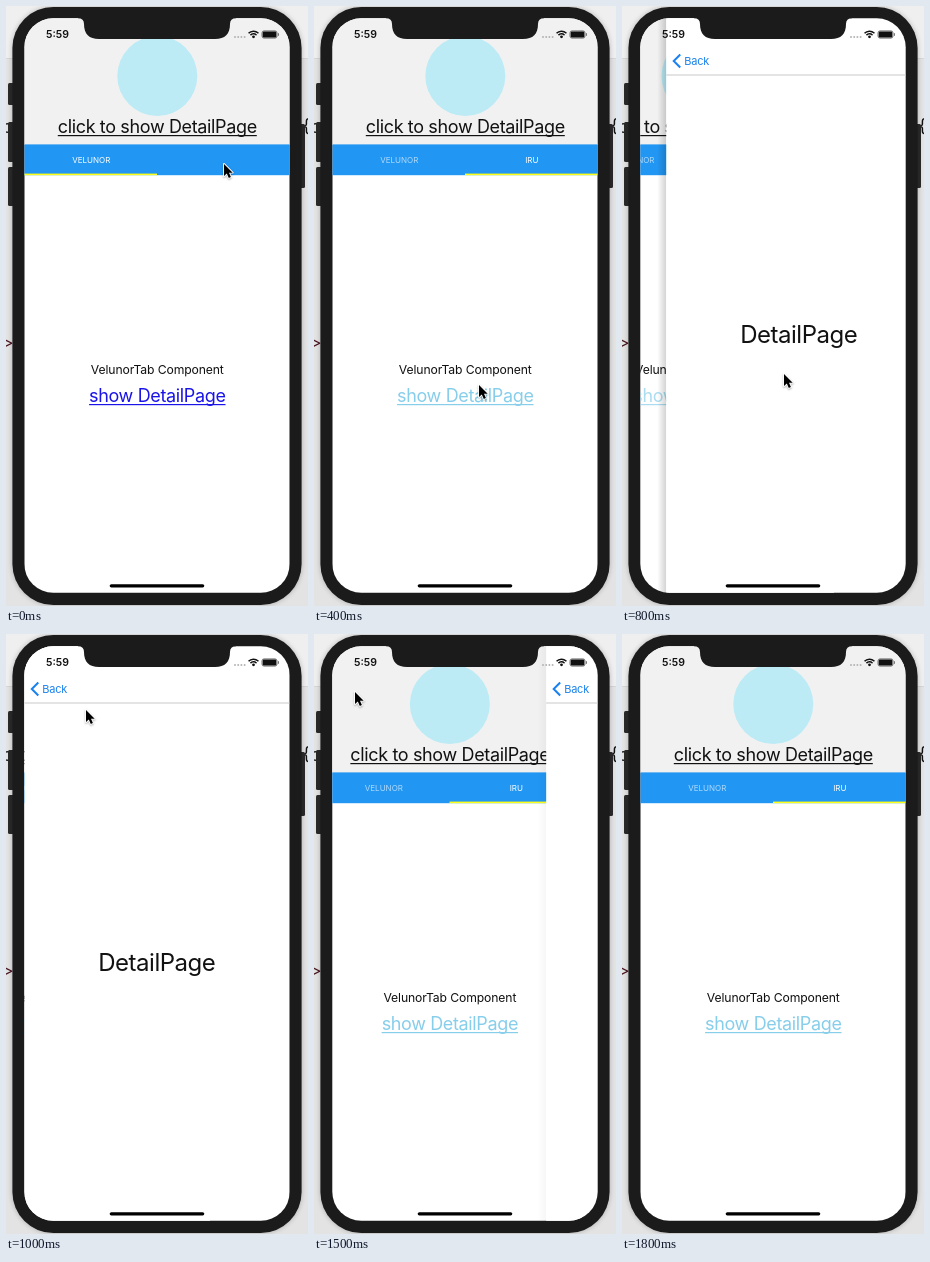
An HTML page with a canvas for the animation above (1900 ms loop, 302 px wide and 600 px high).

```html
<!DOCTYPE html>
<html lang="en">
<head>
<meta charset="utf-8">
<title>Tab and detail navigation</title>
<style>
  html, body { margin: 0; width: 100%; height: 100%; overflow: hidden; background: #e4e4e4; }
  canvas { display: block; width: 302px; height: 600px; }
</style>
</head>
<body>
<canvas id="stage"></canvas>
<script>
const W = 302, H = 600, LOOP = 1900, STEP = 100;
const SCREEN = { x: 18.3, y: 12.3, w: 265.4, h: 574.5, r: 29 };
const PARALLAX = 0.3;
const PUSH = 700, POP = 1400;

const canvas = document.getElementById('stage');
const ctx = canvas.getContext('2d');
const dpr = window.devicePixelRatio || 1;
canvas.width = W * dpr;
canvas.height = H * dpr;

// [time, x, y] of the pointer tip
const POINTER = [
  [0, 218, 158], [100, 218, 158], [400, 165, 379], [600, 161, 388],
  [700, 161, 388], [800, 162, 368], [1000, 80, 76], [1200, 41, 58],
  [1600, 41, 58], [1700, -20, 80], [1900, -20, 80]
];

const clamp = v => Math.max(0, Math.min(1, v));
const settle = (elapsed, tau) => {
  const p = elapsed <= 0 ? 0 : 1 - Math.exp(-elapsed / tau);
  return p > 0.996 ? 1 : p;
};

function pointerAt(t) {
  const i = POINTER.findIndex((k, n) => n > 0 && t <= k[0]);
  const [t0, x0, y0] = POINTER[i - 1], [t1, x1, y1] = POINTER[i];
  const u = (t - t0) / (t1 - t0), e = u * u * (3 - 2 * u);
  return [x0 + (x1 - x0) * e, y0 + (y1 - y0) * e];
}

function rect(x, y, w, h, color) {
  ctx.fillStyle = color;
  ctx.fillRect(x, y, w, h);
}

function roundRect(x, y, w, h, r, color) {
  ctx.fillStyle = color;
  ctx.beginPath();
  ctx.roundRect(x, y, w, h, r);
  ctx.fill();
}

function circle(x, y, r, color) {
  ctx.fillStyle = color;
  ctx.beginPath();
  ctx.arc(x, y, r, 0, 7);
  ctx.fill();
}

function text(str, x, y, size, color, { align = 'center', weight = 400, underline = false, alpha = 1, track = -0.02 } = {}) {
  ctx.save();
  ctx.globalAlpha *= alpha;
  ctx.font = `${weight} ${size}px Inter, "Liberation Sans", sans-serif`;
  ctx.letterSpacing = `${size * track}px`;
  ctx.textAlign = align;
  ctx.fillStyle = color;
  ctx.fillText(str, x, y);
  if (underline) {
    const w = ctx.measureText(str).width;
    ctx.fillRect(x - w / 2, y + 2, w, 1.2);
  }
  ctx.restore();
}

function drawBackdrop() {
  rect(0, 0, W, H, '#e3e3e3');
  rect(0, 0, W, 52, '#efefef');
  rect(0, 52, W, 1, '#d6d6d6');
  text('c', -4, 127, 18, '#222', { align: 'left' });
  text('{', 296.5, 126, 18, '#111', { align: 'left' });
  text('>', -3, 342, 16, '#4a1420', { align: 'left' });
}

function drawBody() {
  for (const [y, h] of [[77, 22], [116, 40], [161, 39]]) roundRect(2, y, 8, h, 1.5, '#2a2a2a');
  roundRect(291, 118, 8, 64, 1.5, '#2a2a2a');
  ctx.save();
  ctx.shadowColor = 'rgba(0,0,0,.25)';
  ctx.shadowBlur = 5 * dpr;
  roundRect(6.4, 1, 289.2, 598, 41, '#1b1b1b');
  ctx.restore();
}

function drawTabPage(x, linkColor, linkAlpha) {
  text('VelunorTab Component', x + 133, 368, 12.2, '#111', { track: -0.01 });
  text('show DetailPage', x + 133, 396, 18, linkColor, { underline: true, alpha: linkAlpha });
}

function drawHome(x, t) {
  const tab = settle(t, 50), w = SCREEN.w;
  const linkAlpha = t < PUSH ? 1 - 0.8 * clamp((t - 500) / 200) : 0.2 + 0.8 * clamp((t - PUSH) / 160);
  rect(x, 12, w, 575, '#fff');
  rect(x, 12, w, 127, '#f1f1f1');
  circle(x + 133, 70, 40, '#bcebf6');
  text('click to show DetailPage', x + 133, 127, 18, '#111', { underline: true });
  drawTabPage(x - w * tab, '#1a14e8', 1);
  drawTabPage(x + w * (1 - tab), '#87ceeb', linkAlpha);

  rect(x, 138.4, w, 30.8, '#2196f3');
  text('VELUNOR', x + 67, 156.5, 8, '#fff', { alpha: 1 - 0.35 * tab, track: 0 });
  text('IRU', x + 199.5, 156.5, 8, '#fff', { alpha: tab, track: 0 });
  rect(x + w / 2 * tab, 167.6, w / 2, 1.6, '#ffff1a');
}

function drawDetail(x, t) {
  const backAlpha = t === POP ? 0.35 : 1;
  const shade = ctx.createLinearGradient(x - 9, 0, x, 0);
  shade.addColorStop(0, 'rgba(0,0,0,0)');
  shade.addColorStop(1, `rgba(0,0,0,${0.19 * (1 - (x - SCREEN.x) / SCREEN.w)})`);
  rect(x - 9, 12, 9, 575, shade);
  rect(x, 12, SCREEN.w, 575, '#fff');
  rect(x, 68.5, SCREEN.w, 1, '#c9c9c9');

  ctx.save();
  ctx.globalAlpha = backAlpha;
  ctx.strokeStyle = '#1a82ee';
  ctx.lineWidth = 2;
  ctx.beginPath();
  ctx.moveTo(x + 14, 48.5);
  ctx.lineTo(x + 7.5, 55);
  ctx.lineTo(x + 14, 61.5);
  ctx.stroke();
  text('Back', x + 18, 59, 11, '#1a82ee', { align: 'left' });
  ctx.restore();

  text('DetailPage', x + 132.5, 337, 24, '#111');
}

function drawNotch() {
  ctx.fillStyle = '#1b1b1b';
  ctx.beginPath();
  ctx.moveTo(72, 11);
  ctx.lineTo(72, 12.3);
  ctx.quadraticCurveTo(78, 12.3, 78, 18);
  ctx.bezierCurveTo(78, 28, 83, 33, 93, 33);
  ctx.lineTo(209, 33);
  ctx.bezierCurveTo(219, 33, 224, 28, 224, 18);
  ctx.quadraticCurveTo(224, 12.3, 230, 12.3);
  ctx.lineTo(230, 11);
  ctx.fill();
}

function drawStatus() {
  text('5:59', 40, 32, 10.5, '#111', { align: 'left', weight: 600, track: 0 });
  for (let i = 0; i < 4; i++) circle(229 + i * 3.2, 31, 1, '#b4b4b4');

  ctx.strokeStyle = '#111';
  ctx.lineWidth = 1.5;
  for (const r of [4.2, 6.8]) {
    ctx.beginPath();
    ctx.arc(247.5, 32, r, -Math.PI * 0.76, -Math.PI * 0.24);
    ctx.stroke();
  }
  circle(247.5, 30.8, 1.4, '#111');

  ctx.lineWidth = 0.8;
  ctx.strokeStyle = '#555';
  ctx.beginPath();
  ctx.roundRect(256, 24.9, 15, 7.2, 2);
  ctx.stroke();
  roundRect(256.7, 25.5, 13.6, 6, 1.2, '#111');
  rect(272, 27.2, 1, 2.6, '#777');
}

function drawPointer([x, y]) {
  const outline = [[0, 0], [0, 12], [2.8, 9.4], [4.8, 13.9], [6.9, 13], [5, 8.7], [8.7, 8.7]];
  ctx.save();
  ctx.translate(x, y);
  ctx.beginPath();
  for (const [px, py] of outline) ctx.lineTo(px, py);
  ctx.closePath();
  ctx.shadowColor = 'rgba(0,0,0,.3)';
  ctx.shadowBlur = 2 * dpr;
  ctx.shadowOffsetY = dpr;
  ctx.strokeStyle = '#fff';
  ctx.lineWidth = 1.8;
  ctx.lineJoin = 'round';
  ctx.stroke();
  ctx.shadowColor = 'transparent';
  ctx.fillStyle = '#000';
  ctx.fill();
  ctx.restore();
}

function draw(t) {
  const shown = t < POP ? settle(t - PUSH, 43) : 1 - settle(t - POP, 61);
  ctx.setTransform(dpr, 0, 0, dpr, 0, 0);
  drawBackdrop();
  drawBody();

  ctx.save();
  ctx.beginPath();
  ctx.roundRect(SCREEN.x, SCREEN.y, SCREEN.w, SCREEN.h, SCREEN.r);
  ctx.clip();
  drawHome(SCREEN.x - SCREEN.w * PARALLAX * shown, t);
  if (shown > 0) drawDetail(SCREEN.x + SCREEN.w * (1 - shown), t);
  drawStatus();
  roundRect(103.7, 578.2, 94.6, 3.2, 1.6, '#000');
  ctx.restore();

  drawNotch();
  drawPointer(pointerAt(t));
}

const start = performance.now();
function tick() {
  const t = (performance.now() - start) % LOOP;
  draw(Math.floor(t / STEP) * STEP);
  requestAnimationFrame(tick);
}
tick();
</script>
</body>
</html>
```
